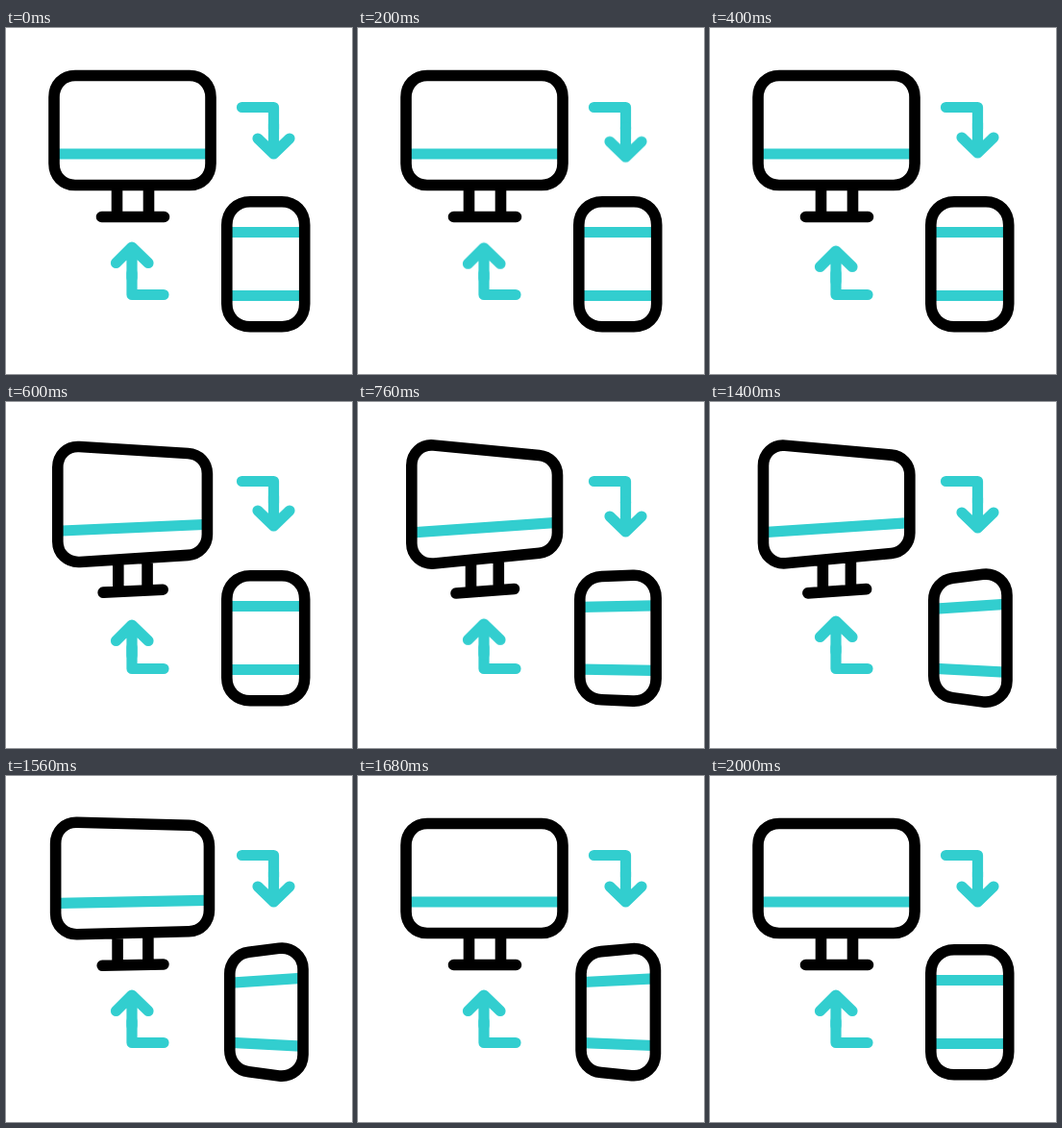
An HTML page without scripts that plays this animation: 360x360 px, repeating every 2.12 s.

```html
<!DOCTYPE html>
<html lang="en">
<head>
<meta charset="utf-8">
<title>Device sync</title>
<style>
  html, body { margin: 0; width: 100%; height: 100%; overflow: hidden; background: #fff; }
  svg { display: block; width: 100%; height: 100%; }
  path { fill: none; stroke-linecap: round; stroke-linejoin: round; }

  .frame { stroke: #000; stroke-width: 11.6; }
  .band, .arrow path { stroke: #32cecf; stroke-width: 11.2; }
  .band { stroke-linecap: butt; }

  /* each device part morphs between --flat and --turned */
  .frame, .band { d: var(--flat); animation: 2.12s ease-in-out infinite; }
  .monitor path { animation-name: monitor; }
  .phone path { animation-name: phone; }
  .tip { animation: 2.12s ease-in-out infinite; }
  .up .tip { animation-name: up; }
  .down .tip { animation-name: down; }

  @keyframes monitor {
    0%, 18.87%, 79.72%, 100% { d: var(--flat); }
    34.91%, 63.21% { d: var(--turned); }
  }
  @keyframes phone {
    0%, 28.3%, 93.4%, 100% { d: var(--flat); }
    47.17%, 71.7% { d: var(--turned); }
  }
  @keyframes up {
    0%, 4.72%, 47.17%, 100% { transform: translateY(0); }
    20.75%, 29.25% { transform: translateY(4px); }
  }
  @keyframes down {
    0%, 54.72%, 100% { transform: translateY(0); }
    5.66% { transform: translateY(0); animation-timing-function: ease-out; }
    11.79%, 36.32% { transform: translateY(4px); }
    24.06% { transform: translateY(-4px); }
    48.58% { transform: translateY(-4px); animation-timing-function: ease-in; }
  }

  .monitor .band {
    --flat: path("M54 131L209 131");
    --turned: path("M60 135.6L204 125.6");
  }
  .monitor .frame {
    --flat: path("M50 72C50 59 59 49.5 72 49.5L191 49.5C204 49.5 213 59 213 72L213 141C213 154 204 163.5 191 163.5L72 163.5C59 163.5 50 154 50 141ZM115.5 164L115.5 196M148.5 164L148.5 196M99.5 196.5L164.5 196.5");
    --turned: path("M55.8 66C55.8 53 66 43.8 78.5 45L188.5 55.5C199.5 56.5 207.5 65 207.5 76L207.5 136C207.5 147 199.5 156 188.5 157.2L79.5 168C66.5 169.2 55.8 160 55.8 147ZM117.5 165L117.5 197M146.3 162L146.3 195M102 199L162.5 194.5");
  }
  .phone .band {
    --flat: path("M232 212.5L308 212.5M232 278.5L308 278.5");
    --turned: path("M235 215.2L307 210.4M235 277.4L307 281.2");
  }
  .phone .frame {
    --flat: path("M229.8 205C229.8 191 240 180.7 254 180.7L287 180.7C301 180.7 310.7 191 310.7 205L310.7 287C310.7 301 301 310.7 287 310.7L254 310.7C240 310.7 229.8 301 229.8 287Z");
    --turned: path("M232.8 206C232.8 194.5 241 184.8 252.5 183.3L284 179.3C297.5 177.6 309 187.5 309 201L309 290C309 303.5 297.5 313.5 284 312L252.5 307.8C241 306.3 232.8 297 232.8 285Z");
  }
</style>
</head>
<body>
<svg viewBox="0 0 360 360">
  <g class="monitor">
    <path class="band"/>
    <path class="frame"/>
  </g>
  <g class="phone">
    <path class="band"/>
    <path class="frame"/>
  </g>
  <g class="arrow down">
    <path d="M245.5 82.5H278.5V105"/>
    <path class="tip" d="M278.5 100V131M262 115L278.5 131L295 115"/>
  </g>
  <g class="arrow up">
    <path d="M164 277.5H131V255"/>
    <path class="tip" d="M131 260V228M114.5 244.5L131 228L148 244.5"/>
  </g>
</svg>
</body>
</html>
```
